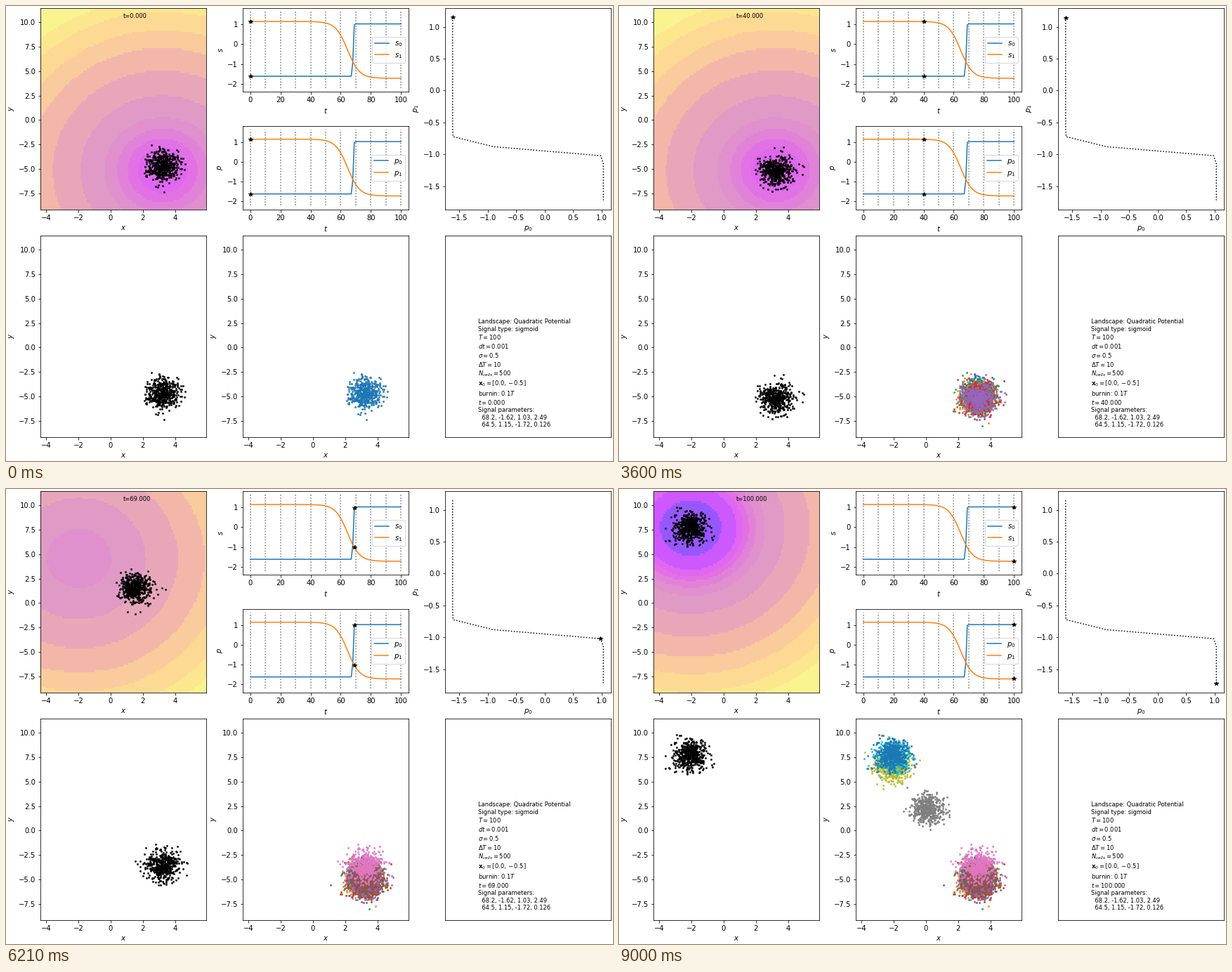
Recreate the animation shown at these times as a matplotlib script. Size 864 by 648 pixels, loop 9.09 s.

```python
import numpy as np
import matplotlib.pyplot as plt
from matplotlib.animation import FuncAnimation
from matplotlib.colors import to_rgb

W, H = 864, 648
T_END, DT, SIGMA, CELLS = 100, 0.05, 0.5, 500
START, BURN_IN, GAP = (0.0, -0.5), 10, 10
# switch time, first level, last level, rate
SIGNALS = [(68.2, -1.62, 1.03, 2.49), (64.5, 1.15, -1.72, 0.126)]
SCALE = np.array([2.0, 3.0])
XLIM, YLIM = (-4.34, 5.92), (-9.12, 11.44)

LEVELS = [-6.8, -5.65, -5.0, -4.4, -3.55, -2.3, 1.0, 6.2, 12.0, 17.5, 24.0, 29.5]
SHADES = ["#9757fe", "#cd58fe", "#e067f0", "#e371e6", "#e083d8", "#df90cd",
          "#df9ac5", "#e8a7b8", "#f3b7a9", "#facb9c", "#fdd994", "#fce78f",
          "#f9f48f"]
PALETTE = np.array([to_rgb(c) for c in SHADES])


def signal(t):
    return np.array([a + 0.5 * (b - a) * (1 + np.tanh(r * (t - tc)))
                     for tc, a, b, r in SIGNALS])


def simulate(seed=7):
    """Cell positions at every whole time, after the burn-in."""
    rng = np.random.default_rng(seed)
    pos = np.tile(START, (CELLS, 1)).astype(float)
    per_unit = round(1 / DT)
    saved = []
    for k in range(-BURN_IN * per_unit, T_END * per_unit + 1):
        if k >= 0 and k % per_unit == 0:
            saved.append(pos.copy())
        slope = 2 * pos / SCALE**2 + signal(max(k * DT, 0))
        pos += -slope * DT + SIGMA * np.sqrt(DT) * rng.standard_normal(pos.shape)
    return saved


times = np.arange(T_END + 1)
p = signal(times)
cells = simulate()

gx, gy = np.meshgrid(np.linspace(*XLIM, 100), np.linspace(*YLIM, 100))
bowl = (gx / SCALE[0])**2 + (gy / SCALE[1])**2


def landscape(t):
    phi = bowl + p[0, t] * gx + p[1, t] * gy
    return PALETTE[np.digitize(phi, LEVELS)]


plt.rcParams.update({"font.family": "DejaVu Sans", "font.size": 10})
fig = plt.figure(figsize=(W / 72, H / 72), dpi=72, facecolor="white")


def panel(left, bottom, height, xlabel="", ylabel=""):
    ax = fig.add_axes([left / W, bottom / H, 236 / W, height / H])
    ax.set_xlabel(xlabel)
    ax.set_ylabel(ylabel)
    return ax


def dots(ax, color):
    return ax.plot([], [], "o", color=color, ms=3, mew=0, alpha=0.88)[0]


def plane(left, bottom):
    ax = panel(left, bottom, 286.6, "$x$", "$y$")
    ax.set(xlim=XLIM, ylim=YLIM, xticks=range(-4, 5, 2),
           yticks=np.arange(-7.5, 10.1, 2.5))
    return ax


def trace(bottom, name):
    ax = panel(337, bottom, 119, "$t$", f"${name}$")
    ax.vlines(range(0, T_END + 1, GAP), -2.21, 1.64, colors="k",
              linestyles=":", linewidth=1.5, alpha=0.55, zorder=1)
    for i in range(2):
        ax.plot(times, p[i], label=f"${name}_{i}$")
    ax.set(xlim=(-5, 105), ylim=(-2.40, 1.83), xticks=range(0, 101, 20),
           yticks=range(-2, 2))
    ax.legend(loc="center right")
    return ax.plot([], [], "k*", zorder=4)[0]


top, low = 358.4, 34.4
ax_land = plane(49, top)
heat = ax_land.imshow(landscape(0), origin="lower", aspect="auto",
                      extent=(*XLIM, *YLIM), interpolation="nearest", zorder=0)
live = dots(ax_land, "k")
clock = ax_land.text(0.5, 0.95, "", transform=ax_land.transAxes, fontsize="small")

trace_stars = [trace(526, "s"), trace(top, "p")]

ax_phase = panel(625, top, 286.6, "$p_0$", "$p_1$")
ax_phase.plot(p[0], p[1], "k:")
ax_phase.set(xticks=np.arange(-1.5, 1.1, 0.5), yticks=np.arange(-1.5, 1.1, 0.5))
phase_star = ax_phase.plot(p[0, :1], p[1, :1], "k*")[0]

sample = dots(plane(49, low), "k")
ax_all = plane(337, low)
history = [dots(ax_all, f"C{i % 10}") for i in range(T_END // GAP + 1)]

ax_info = panel(625, low, 286.6)
ax_info.set(xticks=[], yticks=[])
info = ax_info.text(0.2, 0.05, "", transform=ax_info.transAxes, fontsize="small")


def info_text(t):
    lines = ["Landscape: Quadratic Potential", "Signal type: sigmoid",
             f"$T={T_END}$", "$dt=0.001$", rf"$\sigma={SIGMA}$",
             rf"$\Delta T={GAP}$", f"$N_{{cells}}={CELLS}$",
             r"$\mathbf{x}_0=[%.1f, %.1f]$" % START, "burnin: $0.1T$",
             f"$t={t:.3f}$", "Signal parameters:"]
    lines += ["  " + ", ".join(f"{v:g}" for v in s) for s in SIGNALS]
    return "\n".join(lines)


def update(t):
    heat.set_data(landscape(t))
    live.set_data(*cells[t].T)
    clock.set_text(f"t={t:.3f}")
    for star in trace_stars:
        star.set_data([t, t], p[:, t])
    phase_star.set_data(p[:1, t], p[1:, t])
    last = t // GAP
    sample.set_data(*cells[last * GAP].T)
    for i, group in enumerate(history):
        group.set_data(*(cells[i * GAP].T if i <= last else ([], [])))
    info.set_text(info_text(t))
    return []


anim = FuncAnimation(fig, update, frames=T_END + 1, interval=90,
                     init_func=lambda: update(0), repeat=True, repeat_delay=0)
plt.show()
```
